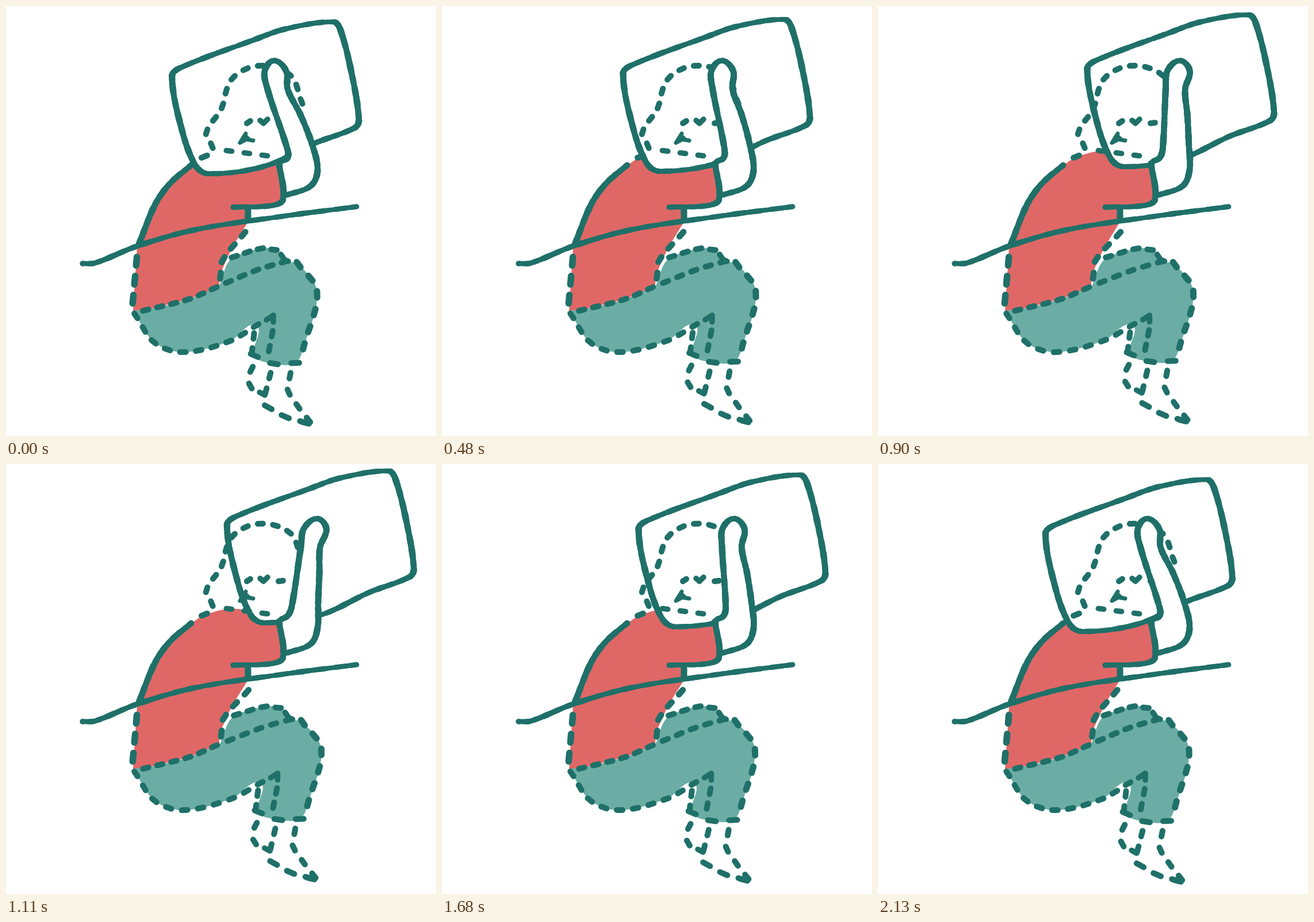
Recreate the animation shown at these times as an HTML page with a canvas. Size 748x748 px, loop 2.16 s.

```html
<!DOCTYPE html>
<html lang="en">
<head>
<meta charset="utf-8">
<title>Side sleeper</title>
<style>
html, body { margin: 0; width: 100%; height: 100%; overflow: hidden; background: #fff; }
canvas { display: block; }
</style>
</head>
<body>
<canvas id="stage" width="748" height="748"></canvas>
<script>
const ctx = document.getElementById('stage').getContext('2d');
const LOOP = 2160, STEP = 30;
const INK = '#1f7069', RED = '#df6866', TEAL = '#6bada4', WHITE = '#fff';

const clamp = v => Math.max(0, Math.min(1, v));
const ease = v => clamp(v) ** 2 * (3 - 2 * clamp(v));
const wave = (t, start) => Math.cos((t - start) / LOOP * 2 * Math.PI);
const pts = s => s.split(' ').map(p => p.split(',').map(Number));
const gap = (a, b) => Math.hypot(b[0] - a[0], b[1] - a[1]) || 1;

// Pillow travel: an almost even pace with rounded turns
const slideAt = t => 48.5 - 52 * Math.asin(.93 * wave(t, 115)) / Math.asin(.93);

// Leg swing from 0 to 1, lingering at the far end
const swingAt = t => 1 - (.5 + .5 * wave(t, -60)) ** 1.5;

// Samples of a smooth line through key points
function curve(p, closed) {
  const n = p.length, out = [], SUB = 14;
  const at = i => closed ? p[(i + n) % n] : p[Math.max(0, Math.min(n - 1, i))];
  const dir = i => {
    const a = at(i - 1), b = at(i + 1), d = gap(a, b);
    return [(b[0] - a[0]) / d, (b[1] - a[1]) / d];
  };
  for (let i = 0; i < (closed ? n : n - 1); i++) {
    const a = at(i), b = at(i + 1), da = dir(i), db = dir(i + 1), h = gap(a, b) / 3;
    for (let j = 0; j < SUB; j++) {
      const s = j / SUB, r = 1 - s;
      out.push([0, 1].map(k => r * r * r * a[k] + 3 * r * r * s * (a[k] + da[k] * h)
        + 3 * r * s * s * (b[k] - db[k] * h) + s * s * s * b[k]));
    }
  }
  out.push(closed ? p[0] : p[n - 1]);
  return out;
}

function trace(line) {
  ctx.beginPath();
  line.forEach(q => ctx.lineTo(q[0], q[1]));
}

function fill(line, color) {
  trace(line);
  ctx.fillStyle = color;
  ctx.fill();
}

function plain(line, w = 10) {
  trace(line);
  ctx.lineWidth = w;
  ctx.stroke();
}

// Brush line: uneven, and thicker where it runs upright
function ink(p, closed) {
  const line = curve(p, closed);
  for (let i = 1; i < line.length; i++) {
    const a = line[i - 1], b = line[i];
    const upright = Math.abs(b[1] - a[1]) / gap(a, b);
    plain([a, b], 8.6 + 2.2 * upright + .5 * Math.sin(i * 1.7) + .4 * Math.sin(i * .61 + 2));
  }
}

// Evenly spaced dashes, the first and last centred on the ends
function dashes(p, count, len = 20, w = 10) {
  const line = curve(p), steps = line.slice(1).map((q, i) => gap(line[i], q));
  const pitch = steps.reduce((sum, d) => sum + d) / (count - 1), h = (len - w) / 2;
  let i = 0, passed = 0;
  for (let n = 0; n < count; n++) {
    while (i < steps.length - 1 && passed + steps[i] < n * pitch) passed += steps[i++];
    const a = line[i], b = line[i + 1], s = (n * pitch - passed) / steps[i];
    const [ux, uy] = [0, 1].map(k => (b[k] - a[k]) / gap(a, b));
    const x = a[0] + (b[0] - a[0]) * s, y = a[1] + (b[1] - a[1]) * s;
    plain([[x - ux * h, y - uy * h], [x + ux * h, y + uy * h]], w);
  }
}

const pillow = pts('287,122 303,107 430,59 485,40 568,28 580,42 600,120 612,198 605,212 535,239 448,279 350,292 328,278 304,215');

// Arm points: x, y and how far x follows the pillow
const arm = pts('479,270,0 490,264,0 489,248,8 453,142,60 449,112,69 465,95,76 486,113,71 489,145,57 512,190,33 532,240,11 542,285,0 530,313,0 488,329,0');

const back = pts('322,277 285,309 259,346 231,415');
const neck = pts('322,277 345,263 388,252 430,257 474,272');
const sleeve = pts('475,274 482,336 463,347 395,350');
const blanket = pts('133,448 155,447 230,417 330,389 480,366 610,349');
const belly = pts('413,397 377,442 373,469');
const side = pts('227,444 221,510');
const waist = pts('243,529 318,510 362,491');
const seat = pts('226,539 259,586 310,602 389,583 435,556');
const thigh = pts('387,480 437,459 484,445');
const knee = pts('509,450 541,497 518,592');
const farKnee = pts('397,436 443,422 466,424');
const hem = pts('432,608 465,622 503,621');
const hair = pts('514,166 494,120 440,104 393,127 374,180 349,219 358,243');

function drawPillow(x) {
  ctx.save();
  ctx.translate(x, -x * .163);
  fill(curve(pillow, true), WHITE);
  ink(pillow, true);
  ctx.restore();
}

function drawHead() {
  dashes(hair, 12, 19);
  dashes(pts('388,252 450,260'), 3, 19, 9.5);
  plain(pts('340,264 350,260'));
  plain(pts('419,204 425,200'));
  plain(pts('474,204 482,203'));
  plain(pts('442,199 448,204 455,197'), 9.5);
  const nose = pts('417,222 407,238 418,232 430,234');
  fill(nose, INK);
  plain(nose, 7);
}

function drawLegs(k) {
  const bend = p => p.map(([x, y]) => {
    const w = k * ease((x - 340) / 110);
    return [x + w * (7.5 + 2 * clamp((y - 600) / 100)), y - 4 * w * clamp((y - 540) / 90)];
  });
  const row = (p, count, len, w) => dashes(bend(p), count, len, w);
  const mark = s => plain(bend(pts(s)), 9.5);

  const shape = [...seat, ...hem, ...[...knee].reverse(), ...pts('486,443'),
    ...[...farKnee].reverse(), ...pts('384,450 370,488'), ...[...waist].reverse(), ...pts('222,531')];
  fill(curve(bend(shape), true), TEAL);

  row(waist, 6);
  row(thigh, 5);
  row(seat, 10);
  row(knee, 6, 22, 11);
  row(farKnee, 4);
  row(belly, 4, 21, 10.5);
  row(hem, 3, 24);
  mark('478,432 484,441 491,444');
  mark('453,546 465,538 465,550');

  row(pts('431,574 428,600'), 2);
  row(pts('463,570 458,596'), 2);
  row(pts('427,632 419,649 425,661'), 2);
  row(pts('459,643 452,670'), 2);
  row(pts('456,698 487,715 518,724'), 3, 24);
  row(pts('494,643 490,667 508,697 526,720'), 4);
  mark('441,672 450,677');
  mark('515,724 527,727');
}

function drawShirt() {
  const rest = pts('480,344 422,350 422,374 394,419 371,469 371,488 318,510 243,529 221,531 228,420');
  fill([...curve(neck), ...rest, ...curve([...back].reverse())], RED);
}

function drawArm(u) {
  const line = arm.map(([x, y, dx]) => [x + dx * u, y]);
  fill(curve(line), WHITE);
  ink(line);
}

function draw(now) {
  const t = Math.floor((now % LOOP) / STEP) * STEP, slide = slideAt(t);
  ctx.fillStyle = WHITE;
  ctx.fillRect(0, 0, 748, 748);
  ctx.strokeStyle = INK;
  ctx.lineCap = ctx.lineJoin = 'round';
  drawShirt();
  drawLegs(swingAt(t));
  drawPillow(slide);
  drawHead();
  ink(back);
  dashes(side, 3, 26, 11.5);
  drawArm(slide / 97);
  ink(sleeve);
  plain(pts('421,354 421,371'), 11);
  ink(blanket);
}

const start = performance.now();
function tick() {
  draw(performance.now() - start);
  requestAnimationFrame(tick);
}
tick();
</script>
</body>
</html>
```
